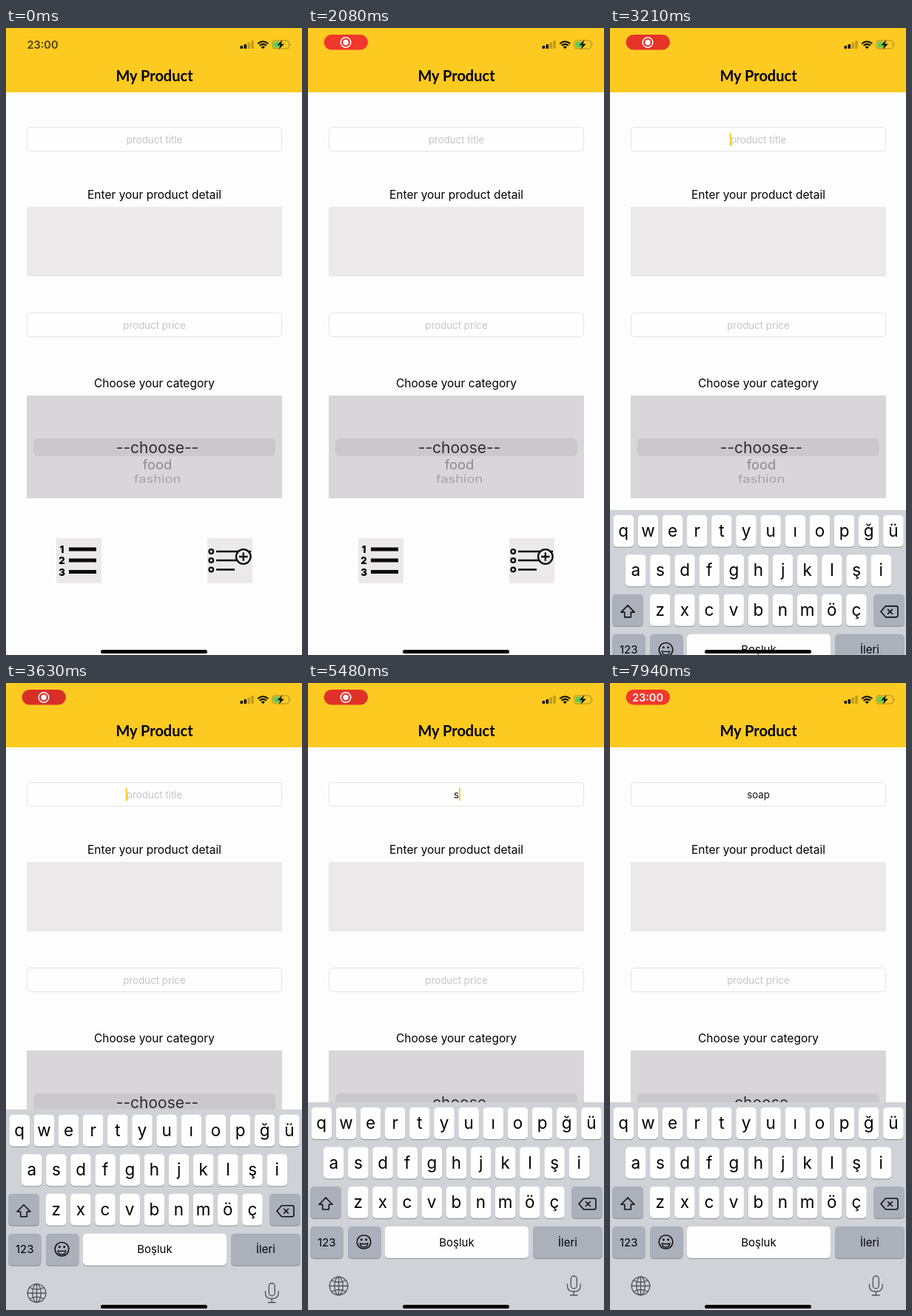
An HTML page that plays this animation: 400x848 px, repeating every 7990 ms.

```html
<!DOCTYPE html>
<html lang="en">
<head>
<meta charset="utf-8">
<title>My Product</title>
<style>
  html, body { margin: 0; width: 100%; height: 100%; overflow: hidden; background: #fdfdfe; }
  svg { display: block; width: 400px; height: 848px; }
  text { font-family: Inter, "Liberation Sans", sans-serif; text-anchor: middle; }
  .label { font-size: 15.5px; }
  .field { fill: #fefefe; stroke: #e4e3e7; }
  .hint { font-size: 13.3px; fill: #c5c4c9; }
  .clock { font-size: 14.5px; font-weight: 600; }
  .pale { fill: #ebe9ea; }
  .key { font-size: 22.5px; }
  .small { font-size: 15px; }
  .line { fill: none; stroke: #111; stroke-width: 1.6; stroke-linecap: round; stroke-linejoin: round; }
  .thin { stroke: #50525a; stroke-width: 1.3; }
</style>
</head>
<body>
<svg viewBox="0 0 400 848">
  <rect width="400" height="848" fill="#fdfdfe"/>
  <rect width="400" height="87" fill="#fcca20"/>
  <text x="200.5" y="72" style="font:700 20px Lato, sans-serif">My Product</text>

  <!-- status bar -->
  <text id="darkClock" class="clock" x="49.5" y="28" fill="#4d4010">23:00</text>
  <g id="pill">
    <rect id="pillBg" x="21.5" y="9" width="59.5" height="20.5" rx="10.25"/>
    <g id="record" fill="#fff">
      <circle cx="51" cy="19.5" r="6.8" fill="none" stroke="#fff" stroke-width="1.5"/>
      <circle cx="51" cy="19.5" r="3.7"/>
    </g>
    <text id="lightClock" class="clock" x="51" y="24.5" fill="#fff">23:00</text>
  </g>
  <g fill="#111">
    <rect x="316.5" y="24" width="3.6" height="4" rx="1"/>
    <rect x="321.5" y="22" width="3.6" height="6" rx="1"/>
    <rect x="326.4" y="19.5" width="3.6" height="8.5" rx="1" opacity=".25"/>
    <rect x="331.2" y="17" width="3.6" height="11" rx="1" opacity=".25"/>
    <path d="M344.6 25.5q2.7-2.2 5.4 0l-2.7 2.8z"/>
    <path d="M340.2 21.2q7-6 14.2 0M342.6 23.8q4.7-3.8 9.4 0" fill="none" stroke="#111" stroke-width="2"/>
  </g>
  <rect x="360" y="17" width="22.5" height="11" rx="3.2" fill="none" stroke="#a58c35"/>
  <path d="M384 20.5q2 2 0 4z" fill="#a58c35"/>
  <rect x="361.5" y="18.5" width="10" height="8" rx="2" fill="#62cc50"/>
  <path d="M373.5 16l-7 7.3h4.2l-2 5.8 7.3-7.6h-4.3z" fill="#111"/>

  <!-- form -->
  <rect class="field" x="28.5" y="134.5" width="344" height="32" rx="4"/>
  <text id="title" class="hint" x="200.5" y="155.5"></text>
  <rect id="caret" y="142" width="2" height="17.5" fill="#fccf2a"/>
  <text class="label" x="200.5" y="230.5">Enter your product detail</text>
  <rect class="pale" x="28" y="242" width="345" height="94"/>
  <rect class="field" x="28.5" y="385.5" width="344" height="32" rx="4"/>
  <text class="hint" x="200.5" y="406.5">product price</text>
  <text class="label" x="200.5" y="485.5">Choose your category</text>
  <rect x="28" y="497" width="345" height="139" fill="#d8d6d8"/>
  <rect x="37" y="555" width="327" height="24" rx="6" fill="#cac8cb"/>
  <text x="204.5" y="575" font-size="21" fill="#2e2d2e">--choose--</text>
  <text x="204.5" y="596.5" font-size="18.4" fill="#8b8a8c">food</text>
  <text transform="translate(204.5 614.5) scale(1 .75)" font-size="18.4" fill="#a3a2a4">fashion</text>

  <!-- buttons -->
  <rect class="pale" x="68" y="690" width="61" height="61"/>
  <g font-size="13" font-weight="900">
    <text x="75.5" y="709.5">1</text>
    <text x="75.5" y="725">2</text>
    <text x="75.5" y="740.5">3</text>
  </g>
  <path d="M85 705h37M85 720h37M85 735.5h37" stroke="#0c0c0c" stroke-width="5"/>
  <rect class="pale" x="272" y="690" width="61" height="61"/>
  <g fill="none" stroke="#0c0c0c" stroke-width="2.3">
    <circle cx="277.3" cy="708" r="2.8"/>
    <circle cx="277.3" cy="720" r="2.8"/>
    <circle cx="277.3" cy="732.5" r="2.8"/>
    <path d="M284 708h47M284 720h28M284 732.5h25"/>
    <circle cx="320.8" cy="715" r="9.8" class="pale"/>
    <path d="M315 715h11.6M320.8 709.2v11.6"/>
  </g>

  <!-- keyboard, drawn from its own top edge -->
  <g id="board">
    <rect width="400" height="290" fill="#d0d2d8"/>
    <g id="keys"></g>
    <path class="line" d="M24 129l-9 9.3h4.7v6.7h8.6v-6.7h4.7z"/>
    <path class="line" d="M366 137.5l6.5-7.5h14q2.500 0 2.500 2.500v10q0 2.500-2.500 2.500h-14zM375.500 134.500l6 6m0-6l-6 6"/>
    <circle class="line" cx="75.500" cy="189" r="9.300"/>
    <path class="line" d="M70 191q5.500 1.500 11 0-1 5-5.500 5t-5.500-5z" style="stroke-width:1.300"/>
    <circle cx="72.300" cy="186" r="1.400"/>
    <circle cx="78.700" cy="186" r="1.400"/>
    <g class="line thin">
      <circle cx="41.500" cy="248.500" r="12.300"/>
      <ellipse cx="41.500" cy="248.500" rx="5.700" ry="12.300"/>
      <path d="M41.500 236.200v24.600M29.200 248.500h24.600M32 241q9.500 5 19 0M32 256q9.500-5 19 0"/>
      <rect x="355.300" y="235" width="8" height="17" rx="4"/>
      <path d="M350.500 246v2.500q0 7.500 8.800 7.500t8.800-7.500v-2.500M359.300 256v5M354.500 261h9.600"/>
    </g>
  </g>
  <rect x="128" y="841" width="144" height="5" rx="2.5"/>
</svg>
<script>
const LOOP = 7990, KEYBOARD_AT = 2840, CARET_AT = 2740;
const PULSE = 1650, DIMMEST = 1570, STALL_AT = 2400, STALL = 340;
const word = "soap", typedAt = [5200, 5800, 6400, 7000];
const $ = id => document.getElementById(id);
const clamp = (v, lo, hi) => Math.max(lo, Math.min(hi, v));
const ramp = (t, from, to) => { const p = clamp((t - from) / (to - from), 0, 1); return p * p * (3 - 2 * p); };

function key(x, y, w, label = "", grey = false, cls = "key") {
  const box = (dy, fill) => `<rect x="${x}" y="${y + dy}" width="${w}" height="43" rx="5" fill="${fill}"/>`;
  const base = y + (cls === "key" ? 29 : 26.5);
  return box(1, "#8c8e93") + box(0, grey ? "#abb0bb" : "#fefefe") +
    `<text class="${cls}" x="${x + w / 2}" y="${base}">${label}</text>`;
}

const row = (letters, x, y) => [...letters].map((c, i) => key(x + i * 33.15, y, 27.5, c)).join("");

$("keys").innerHTML =
  row("qwertyuıopğü", 4.5, 7) + row("asdfghjklşi", 21, 60.5) + row("zxcvbnmöç", 54, 114) +
  key(3, 114, 42, "", true) + key(356, 114, 42, "", true) +
  key(3, 168, 44.5, "123", true, "small") + key(54, 168, 44.5, "", true) +
  key(104, 168, 194, "Boşluk", false, "small") + key(304, 168, 94, "İleri", true, "small");

function draw(t) {
  // recording pill: appears with its icon, breathes, later shows the clock
  const shown = ramp(t, 20, 400);
  const clock = ramp(t, 6900, 7300);
  // breathing pauses briefly while the keyboard loads
  const breath = t - clamp(t - STALL_AT, 0, STALL);
  const glow = .5 - .5 * Math.cos((breath - DIMMEST) / PULSE * 2 * Math.PI);
  $("pill").style.opacity = shown;
  $("darkClock").style.opacity = 1 - shown;
  $("record").style.opacity = 1 - clock;
  $("lightClock").style.opacity = clock;
  $("pillBg").setAttribute("fill", `rgb(${214 + 40 * glow},${47 + 10 * glow},${40 + 6 * glow})`);

  // critically damped rise
  const s = Math.max(0, t - KEYBOARD_AT) * .00655;
  const top = 567 + 281 * (1 + s) * Math.exp(-s);
  $("board").setAttribute("transform", `translate(0 ${top})`);

  const count = typedAt.filter(at => t >= at).length;
  const title = $("title");
  title.textContent = count ? word.slice(0, count) : "product title";
  title.style.fill = count ? "#111" : "";
  const half = title.getComputedTextLength() / 2;
  $("caret").setAttribute("x", count ? 200.5 + half : 199.5 - half);
  const since = t - (count ? typedAt[count - 1] : 3150);
  const lit = since < 0 ? t >= CARET_AT : since % 1000 < 600;
  $("caret").style.opacity = lit ? 1 : 0;
}

function tick() {
  draw(performance.now() % LOOP);
  requestAnimationFrame(tick);
}
tick();
</script>
</body>
</html>
```
